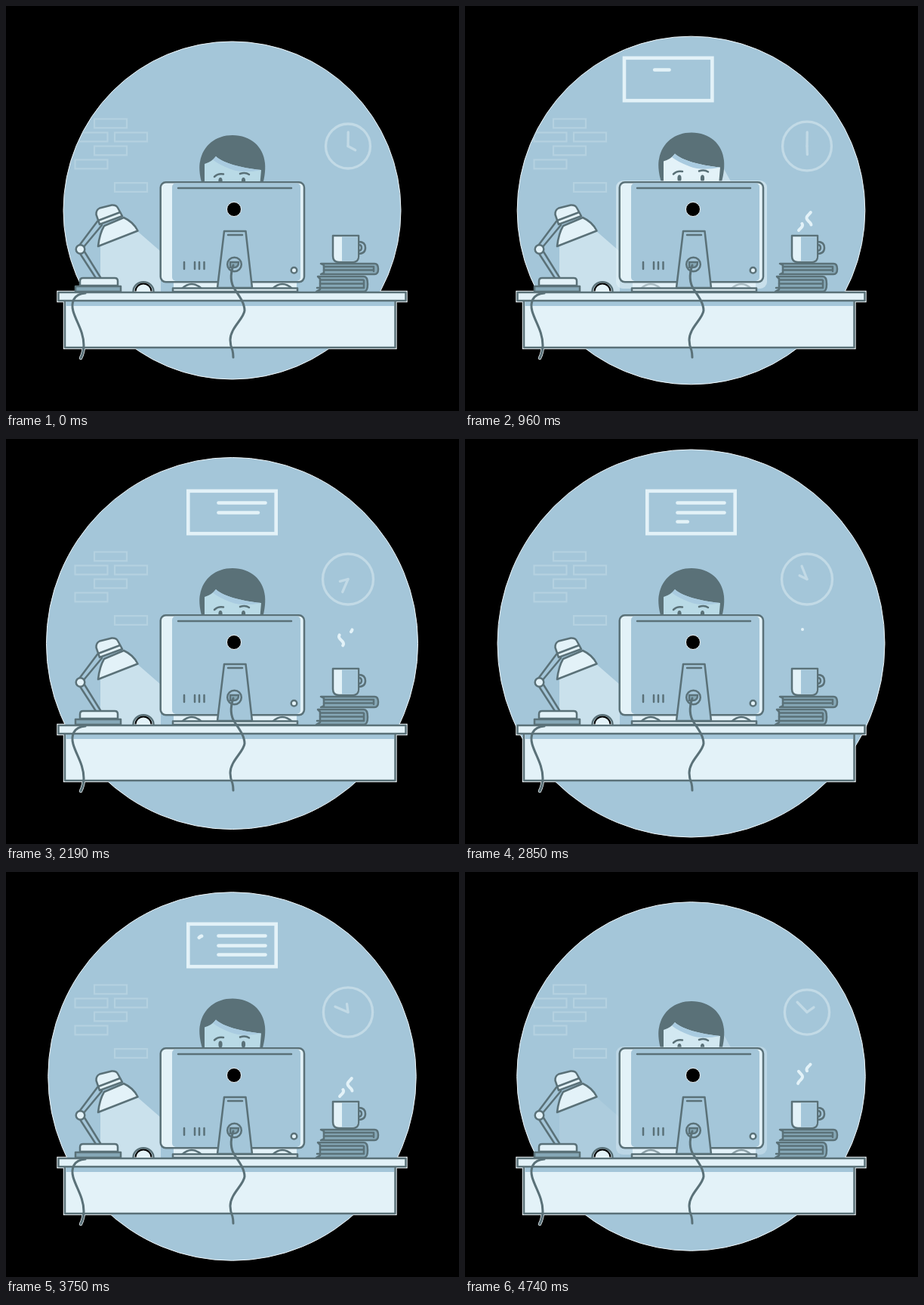
Write an HTML page that moves like this. It is 600 px wide and 536 px high and loops after 4.77 s.

```html
<!DOCTYPE html>
<html lang="en">
<head>
<meta charset="utf-8">
<title>At the desk</title>
<style>
  html, body { margin: 0; width: 100%; height: 100%; overflow: hidden; background: #000; }
  svg { display: block; width: 100vw; height: 100vh; }
  .ink { stroke: #5a7178; stroke-width: 2.5; stroke-linejoin: round; stroke-linecap: round; }
  .thick { stroke-width: 3; }
  .line { fill: none; }
  .light { fill: #e3f2f8; }
  .blue { fill: #a4c6d9; }
  .dark { fill: #5a7178; }
  .mid { fill: #86a8b7; }
  .rim { fill: none; stroke: #eef5f8; stroke-width: 4.4; stroke-linecap: round; }
  .edge { fill: none; stroke: #eef5f8; stroke-width: 1; }
  .chalk { fill: none; stroke: #e3f2f8; stroke-width: 4.6; stroke-linecap: round; }
  .faint { fill: none; stroke: #b4d1e0; stroke-width: 2.2; }
  .clock { fill: none; stroke: #c2dae6; stroke-width: 3.3; stroke-linecap: round; }
  .steam { fill: none; stroke: #e3f2f8; stroke-width: 4; stroke-linecap: round; stroke-linejoin: round; }
</style>
</head>
<body>
<svg viewBox="0 0 600 536">
  <defs>
    <clipPath id="port"><circle class="disc" cx="299.5" cy="270.5" r="223.5"/></clipPath>
    <rect id="front" x="78" y="389" width="437.5" height="63"/>
    <rect id="slab" x="69.5" y="379" width="460" height="11"/>
    <path id="cord" d="M105 380C89 381 86 393 89 404C93 418 103 431 103 449Q103 458 99 466"/>
  </defs>

  <!-- pale rim, seen only against the black -->
  <g class="rim"><use href="#front"/><use href="#slab"/><use href="#cord"/></g>
  <circle class="disc blue" cx="299.5" cy="270.5" r="223.5"/>
  <circle class="disc edge" cx="299.5" cy="270.5" r="223.5"/>

  <g clip-path="url(#port)">
    <g id="bricks" class="faint"></g>
    <g class="clock">
      <circle id="dial" cx="453" cy="185.5" r="29.5"/>
      <path id="minute" d="M453 185.5V167"/>
      <path id="hour" d="M453 185.5V174.5"/>
    </g>
    <g id="board" class="chalk">
      <rect x="241.3" y="68.8" width="116.4" height="56.4" stroke-linecap="butt"/>
      <path class="stroke" pathLength="100" d="M281.5 84.5H343.5"/>
      <path class="stroke" pathLength="100" d="M281.5 97.5H343.5"/>
      <path class="stroke" pathLength="100" d="M281.5 109.5H343.5"/>
      <path class="stroke" pathLength="100" d="M255.8 86.8A8.5 8.5 0 1 1 255.7 86.9"/>
    </g>
  </g>

  <path id="beam" class="light" d="M125 317L174 298L205 325V378H125Z"/>
  <path class="glow light" d="M342 214L353 234H338Z"/>

  <!-- person -->
  <g id="head">
    <path class="dark" d="M261 240C255 222 256 210 257 206C261 184 278 171 300 171C324 171 341 186 343 208C344 219 342 229 339 240Z"/>
    <path id="face" d="M263 240V209Q273 206 278 199C288 208 309 214 338 217L336 240Z"/>
    <path fill="#a9cbe0" d="M278 199C288 208 309 214 338 217Q314 222 298 216Q282 210 274 203.500Z"/>
    <path class="ink line" d="M276 226Q281 221 288 222.500M310 222Q317 219.500 322 223"/>
    <ellipse class="dark" cx="284" cy="231.500" rx="2.600" ry="4.500"/>
    <ellipse class="dark" cx="314.500" cy="231.500" rx="2.600" ry="4.500"/>
  </g>

  <!-- desk -->
  <use href="#front" class="ink light"/>
  <rect class="blue" x="79.500" y="390" width="434.500" height="7"/>
  <use href="#slab" class="ink light"/>

  <!-- lamp -->
  <path class="ink line" d="M97 317L121 285M102 320L127 290M97 326L119 360M102 322L125 359"/>
  <circle class="ink light" cx="98.500" cy="322" r="5.800"/>
  <rect class="ink mid" x="92" y="371" width="60" height="7"/>
  <path class="ink light" d="M98 370V364Q98 360 102 360H144Q148 360 148 364V370Z"/>
  <path class="ink light" d="M124 289L119.500 276Q119 270 124 267.500L140 263.500Q146 263 148 267L154 278Z"/>
  <path class="ink line" d="M122 284L151 273"/>
  <path class="ink light" d="M122 318Q124 301 130 291L156 280Q169 286 174.500 297.500Z"/>
  <use href="#cord" class="ink thick line"/>

  <!-- small dome -->
  <path class="ink light" d="M168.500 378A13.500 12.800 0 0 1 195.500 378"/>
  <path class="line" stroke="#000" stroke-width="2" d="M171.500 377.500A10.500 10 0 0 1 192.500 377.500"/>

  <!-- computer -->
  <rect class="light" x="222" y="364" width="163" height="10"/>
  <path class="ink light" d="M233 374Q246 362 259 374ZM353 374Q366 362 379 374Z"/>
  <rect class="glow light" x="200" y="231" width="200" height="143" rx="9"/>
  <rect class="ink light" x="221" y="373.500" width="165" height="4.500"/>
  <rect class="ink light" x="204.700" y="233.300" width="190.300" height="132" rx="7"/>
  <rect class="blue" x="220" y="234.500" width="170" height="129.500" rx="5"/>
  <path class="ink line" d="M228 241H378"/>
  <circle cx="302" cy="269" r="9.500" class="edge" style="fill:#000"/>
  <path class="ink line" d="M236 339V348M250 339V348M256 339V348M262.500 339V348"/>
  <circle class="ink light" cx="381.500" cy="349.700" r="3.800"/>
  <path class="ink blue" d="M289 298H317.500L326 373H280Z"/>
  <path class="ink line" d="M294 303H313"/>
  <circle class="ink line" cx="302.500" cy="342" r="9.300"/>
  <path class="ink mid" d="M297 339H308Q308 346 302 346H297Z"/>
  <path class="ink thick line" d="M301 343C297 355 297 366 303 375C309 384 316 393 316 403C315 414 297 426 297 442Q297 449 300 456Q301 460 301 465"/>

  <!-- books and mug -->
  <path class="ink mid" d="M417 341H488Q493 341 493 348Q493 355 488 355H417L421 353V343Z"/>
  <path class="ink mid" d="M411 378H474Q479 378 479 368Q479 358 474 358H413L416 361V375Z"/>
  <path class="ink line" d="M421 345H486M421 349.500H486M416 362.500H473M416 367.500H473M412 373H473M487 345V351M474 363V373"/>
  <path class="ink line" d="M467 312Q476 312 476 320Q476 328 466 328M467 316Q471 316 471 320Q471 324 466 324"/>
  <path class="ink light" d="M433 304H467V331Q467 339 459 339H441Q433 339 433 331Z"/>
  <path class="blue" d="M445 305.200H465.800V331Q465.800 337.800 459 337.800H445Z"/>
  <path id="steamL" class="steam"/>
  <path id="steamR" class="steam"/>
</svg>

<script>
const LOOP = 4770, PUFF = 2790, RISE = 2190;
const $ = id => document.getElementById(id);
const all = sel => [...document.querySelectorAll(sel)];
const clamp = v => Math.max(0, Math.min(1, v));
const mix = (a, b, p) => a + (b - a) * p;
const span = (t, from, length) => clamp((t - from) / length);
const bump = (t, mid, half) => clamp(1 - Math.abs(t - mid) / half);

const discs = all(".disc"), strokes = all(".stroke"), glows = all(".glow");

// Courses of bricks step down the wall, with a few left out.
const brick = (x, y) => `<rect x="${x}" y="${y}" width="43" height="11.8"/>`;
$("bricks").innerHTML = [[117, 0], [91.5, 1], [144, 1], [117, 2], [91.5, 3], [144, 4.7]]
  .map(([x, row]) => brick(x, 149.5 + row * 18)).join("");

// A wisp is a piece of a sine; its top slows while its tail catches up.
function wisp(id, x, born, t) {
  const age = t < born ? -1 : (t - born) % PUFF;
  let d = "";
  if (age >= 0 && age <= RISE + 20) {
    const top = 297 - 45 * (1 - (1 - span(age, 0, RISE)) ** 1.5);
    const tail = 297 - 45 * span(age, 300, RISE - 300) ** 1.5;
    for (let i = 0; i <= 14; i++) {
      const y = mix(top, tail, i / 14);
      const px = x + 3 * Math.cos(Math.PI * (y - 271) / 9.5);
      d += (i ? "L" : "M") + px.toFixed(2) + " " + y.toFixed(2);
    }
  }
  $(id).setAttribute("d", d);
}

function draw(t) {
  const swell = Math.min(t / 2910, 1 - (t - 2910) / PUFF);
  discs.forEach(c => c.setAttribute("r", 223.5 + 34 * swell ** 1.445));

  $("dial").setAttribute("r", 29.5 + 4 * clamp(1.25 * Math.sin(Math.PI * t / LOOP)));
  $("minute").setAttribute("transform", `rotate(${t * .75} 453 185.5)`);
  $("hour").setAttribute("transform", `rotate(${118 + t * .0625} 453 185.5)`);

  const slide = -260 * (1 - span(t, 500, 700)) ** 2 + 270 * span(t, 4220, 460) ** 2;
  $("board").setAttribute("transform", `translate(${slide} 0)`);
  strokes.forEach((s, i) => {
    const p = span(t, 808 + 969 * i, 490);
    s.style.visibility = p ? "visible" : "hidden";
    s.setAttribute("stroke-dasharray", `${p * 100} 200`);
  });

  const lift = 3.5 * Math.max(0, Math.cos(2 * Math.PI * (t - 960) / PUFF));
  $("head").setAttribute("transform", `translate(0 ${-lift})`);

  const dim = Math.max(bump(t, 1650, 80), bump(t, 4740, 80));
  $("beam").setAttribute("opacity", mix(.62, .12, dim));

  const glow = Math.max(bump(t, 960, 140), .6 * bump(t, 4740, 140));
  glows.forEach(g => g.setAttribute("opacity", glow * .6));
  $("face").setAttribute("fill", `rgb(${mix(185, 227, glow)},${mix(218, 242, glow)},${mix(230, 248, glow)})`);

  wisp("steamL", 444, 660, t);
  wisp("steamR", 455.5, 90, t);
}

const start = performance.now();
function tick() {
  draw((performance.now() - start) % LOOP);
  requestAnimationFrame(tick);
}
tick();
</script>
</body>
</html>
```
